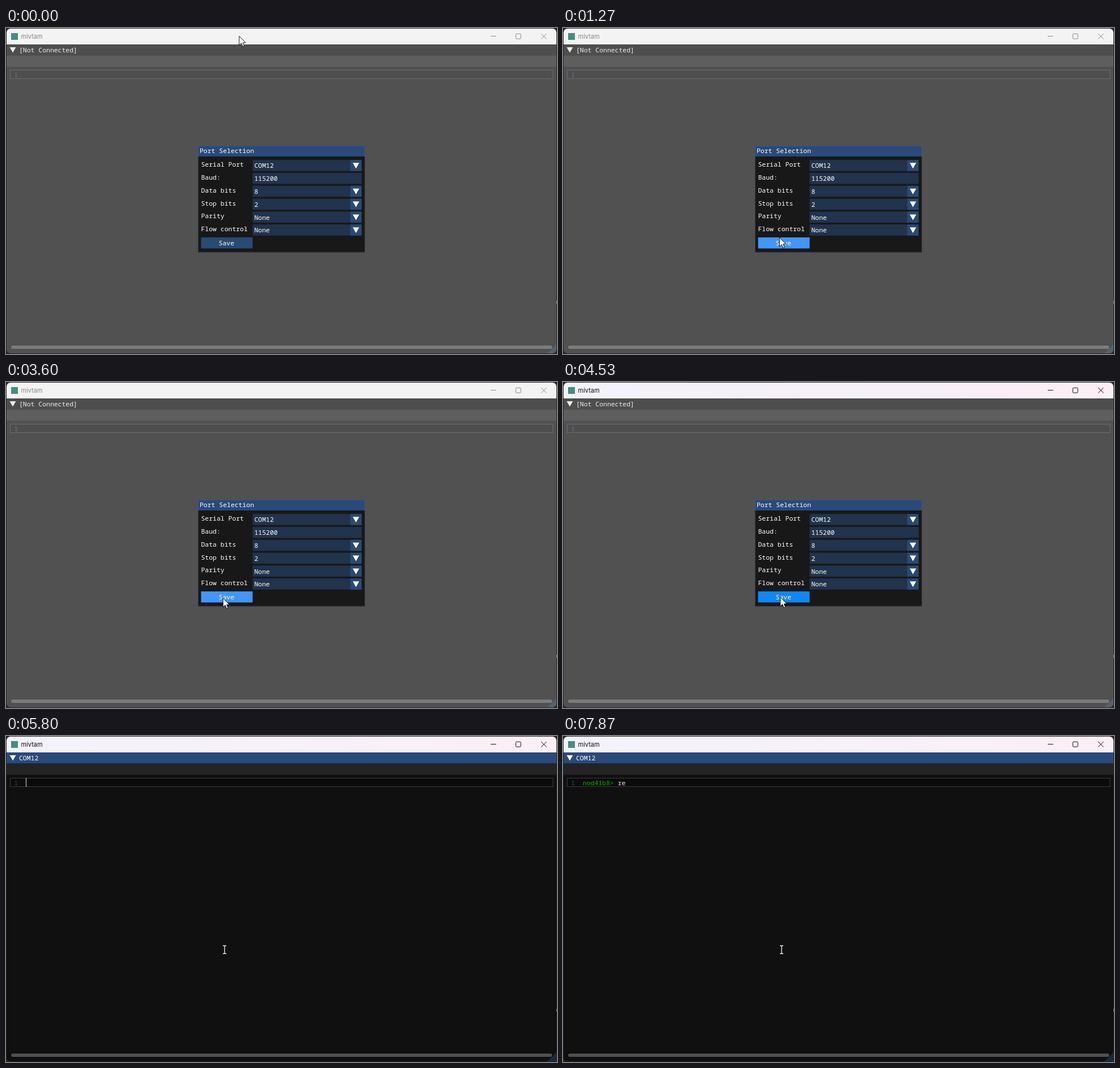
Recreate the animation shown at these times as an HTML page. Size 973 px wide and 576 px high, loop 8 s.

```html
<!DOCTYPE html>
<html lang="en">
<head>
<meta charset="utf-8">
<title>Serial terminal</title>
<style>
  html, body { margin: 0; width: 100%; height: 100%; overflow: hidden; background: #252525; }
  svg { display: block; width: 973px; height: 576px; }
  text { font: 11.45px "Noto Sans Mono", monospace; fill: #fff; white-space: pre; }
  #title { font: 11px Inter, sans-serif; }
</style>
</head>
<body>
<svg id="stage" viewBox="0 0 973 576" xmlns="http://www.w3.org/2000/svg">
  <defs>
    <linearGradient id="tint">
      <stop offset="0" stop-color="#f3f2fa"/>
      <stop offset=".6" stop-color="#f7f0f8"/>
      <stop offset="1" stop-color="#fdeef5"/>
    </linearGradient>
    <clipPath id="frame"><rect x="1" y="1" width="971" height="574" rx="7"/></clipPath>
  </defs>
  <rect width="973" height="576" fill="#252525"/>
  <rect x="971.5" y="482" width="1.5" height="5" fill="#999"/>

  <g clip-path="url(#frame)">
    <rect id="bar" x="1" y="1" width="971" height="28"/>
    <rect x="9" y="9" width="12" height="12" fill="#4a8a80"/>
    <text id="title" x="26.5" y="19">mivtam</text>
    <path id="controls" d="M856 14.5h9.5M945 10l9.5 9.5M954.5 10l-9.5 9.5M901.5 10.3h6.4a1.2 1.2 0 0 1 1.2 1.2v6.4a1.2 1.2 0 0 1-1.2 1.2h-6.4a1.2 1.2 0 0 1-1.2-1.2v-6.4a1.2 1.2 0 0 1 1.2-1.2z" fill="none"/>

    <rect x="1" y="29" width="971" height="546" fill="#0f0f0f"/>
    <rect id="head" x="1" y="29" width="971" height="19.5"/>
    <path d="M6.5 34h11l-5.5 9.5z" fill="#fff"/>
    <text id="port" x="23" y="43.2"></text>
    <rect x="1" y="49" width="971" height="19.5" fill="#242424"/>
    <rect x="7" y="74" width="960" height="495" fill="#101010"/>
    <rect x="7.5" y="74.5" width="958.5" height="15" fill="#0b0b0b" stroke="#3c3c3c"/>
    <rect x="7" y="559.5" width="960" height="9.5" fill="#0c0c0c"/>
    <rect x="9" y="561" width="955.5" height="6" rx="3" fill="#4f4f4f"/>
    <path d="M956 575l16-16v16z" fill="#4296fa" fill-opacity=".2"/>
    <text x="14.3" y="86.8" style="fill:#0b5a5a">1</text>
    <text id="prompt" x="35" y="86.8" style="fill:#00b400">nod41b8&gt;</text>
    <text id="typed" x="97" y="86.8" style="fill:#e6e6e6"></text>
    <rect id="caret" y="74" width="1" height="16" fill="#e0e0e0"/>
    <rect id="dim" x="1" y="29" width="971" height="546" fill="#ccc" fill-opacity=".35"/>
  </g>

  <g id="dialog"></g>
  <path id="arrow" d="M0 0V16L3.8 12.6 6.3 18.4 8.8 17.4 6.4 11.7H11.3z" fill="#fff" stroke="#000" stroke-width=".9"/>
  <g id="beam" fill="none">
    <path d="M-3-7h2.2L0-6.2.8-7H3M0-6.2V6.2M-3 7h2.2L0 6.2.8 7H3" stroke="#000" stroke-width="2.4"/>
    <path d="M-3-7h2.2L0-6.2.8-7H3M0-6.2V6.2M-3 7h2.2L0 6.2.8 7H3" stroke="#fff" stroke-width="1.3"/>
  </g>
</svg>
<script>
const LOOP = 8000;
const $ = id => document.getElementById(id);
const rect = (x, y, w, h, fill, id = '') =>
  `<rect id="${id}" x="${x}" y="${y}" width="${w}" height="${h}" fill="${fill}"/>`;
const label = (x, y, s, anchor = 'start') =>
  `<text x="${x}" y="${y}" text-anchor="${anchor}">${s}</text>`;

const fields = [
  ['Serial Port', 'COM12', true],
  ['Baud:', '115200', false],
  ['Data bits', '8', true],
  ['Stop bits', '2', true],
  ['Parity', 'None', true],
  ['Flow control', 'None', true],
];

function fieldRow([name, value, combo], i) {
  const y = 233.2 + i * 22.8;
  return label(344.5, y + 12, name) +
    rect(435.5, y, 192.5, 19.5, '#21334d') +
    label(438.5, y + 14.2, value) +
    (combo ? rect(608, y, 20, 19.5, '#294a72') +
      `<path d="M612.3 ${y + 5}h11.4l-5.7 10z" fill="#fff"/>` : '');
}

$('dialog').innerHTML =
  rect(339, 208, 295, 188.5, '#181818') +
  rect(339, 208, 295, 19, '#294a7a') +
  '<rect x="339.5" y="208.5" width="294" height="187.5" fill="none" stroke="#6e6e80" stroke-opacity=".3"/>' +
  label(342, 221.4, 'Port Selection') +
  fields.map(fieldRow).join('') +
  rect(344.5, 370, 91, 19.5, '#294a72', 'save') +
  label(389.3, 384.2, 'Save', 'middle');

// Pointer paths: [ms, x, y]
const arrowPath = [
  [0, 411.8, 14.3], [870, 383, 350.5], [1270, 382.3, 370.3], [1730, 382.7, 387],
  [1800, 382.7, 387], [2065, 382.7, 383.3], [3535, 382.7, 383.3], [3665, 383.8, 380.3],
];
const beamPath = [[4600, 387, 383], [4935, 387, 383], [5330, 386, 377.5]];
const smooth = p => p * p * (3 - 2 * p);

function along(path, t) {
  const i = path.findIndex(p => p[0] > t);
  if (i < 0) return path[path.length - 1].slice(1);
  if (i === 0) return path[0].slice(1);
  const [t0, x0, y0] = path[i - 1], [t1, x1, y1] = path[i];
  let p = (t - t0) / (t1 - t0);
  if (t0 === 0) p = smooth(p);
  return [x0 + (x1 - x0) * p, y0 + (y1 - y0) * p];
}

const caretOn = [[5000, 5400], [5800, 6200], [6600, 7070], [7400, 7800]];
const show = (id, on) => $(id).setAttribute('visibility', on ? 'visible' : 'hidden');
const set = (id, name, value) => $(id).setAttribute(name, value);
const move = (id, [x, y]) => set(id, 'transform', `translate(${x} ${y})`);

function render(t) {
  const tick = Math.floor((t + 3.4) * 0.015) / 0.015; // 15 pictures a second
  const active = t >= 4400, open = t >= 4600;
  const ink = active ? '#111' : '#888';

  set('bar', 'fill', active ? 'url(#tint)' : '#f3f3f3');
  $('title').style.fill = ink;
  set('controls', 'stroke', ink);
  set('head', 'fill', open ? '#294a7a' : '#0a0a0a');
  $('port').textContent = open ? 'COM12' : '[Not Connected]';
  show('dim', !open);
  show('dialog', !open);
  set('save', 'fill', active ? '#0f87fa' : t >= 1270 ? '#4296fa' : '#294a72');

  show('arrow', !open);
  move('arrow', along(arrowPath, tick));
  show('beam', open);
  move('beam', along(beamPath, tick));

  show('prompt', t >= 7330);
  $('typed').textContent = t >= 7870 ? 're' : t >= 7330 ? 'r' : '';
  show('caret', caretOn.some(([a, b]) => t >= a && t < b));
  set('caret', 'x', t >= 7330 ? 104 : 35);
}

const start = performance.now();
function loop() {
  render((performance.now() - start) % LOOP);
  requestAnimationFrame(loop);
}
loop();
</script>
</body>
</html>
```
